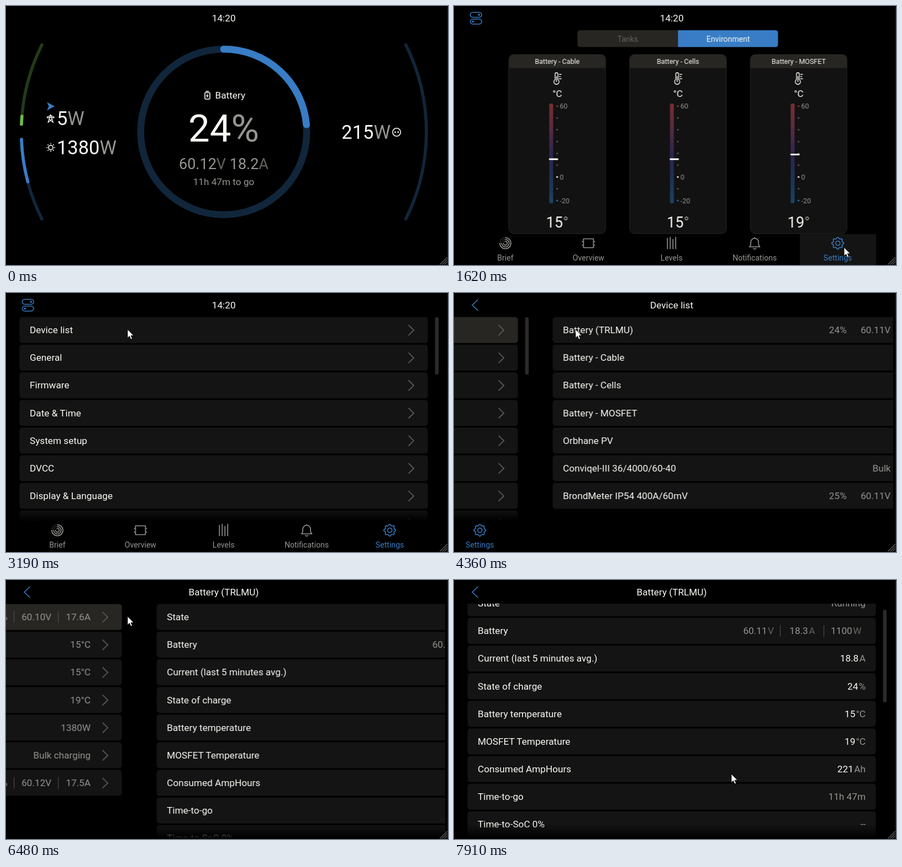
Write an HTML page that moves like this. It is 800 by 470 pixels and loops after 8000 ms.

```html
<!DOCTYPE html>
<html lang="en">
<head>
<meta charset="utf-8">
<title>Energy monitor</title>
<style>
html, body { margin: 0; height: 100%; overflow: hidden; background: #000; }
svg { display: block; width: 800px; height: 470px; }
text { font: 17.2px Roboto, sans-serif; fill: #fafaf5; white-space: pre; }
.s12 { font-size: 12.5px; }
.s14 { font-size: 14.1px; }
.s27 { font-size: 27px; }
.s34 { font-size: 34.45px; }
.s69 { font-size: 69px; }
.m { text-anchor: middle; }
.e { text-anchor: end; }
.g { fill: #969591; }
.d { fill: #64635f; }
.c { fill: currentColor; }
.line { fill: none; stroke: currentColor; stroke-width: 1.6; stroke-linecap: round; stroke-linejoin: round; }
.white { color: #fafaf5; }
.blue { color: #387dc5; }
.grey { color: #969591; }
.chev { fill: none; stroke: #5c5b58; stroke-width: 1.8; }
</style>
</head>
<body>
<svg id="stage" viewBox="0 0 800 470"></svg>
<script>
const W = 802, LOOP = 8000;
const BLUE = '#387dc5', NAVY = '#11263b', GREEN = '#72b84c', MOSS = '#233a18', BAR = '#272622', ROW = '#141414';

// ---- timeline: keyframes written in ms, held unless a step names an easing
const EASE = v => `;animation-timing-function:${v}`;
const QUAD_IN = EASE('cubic-bezier(.333333,0,.666667,.333333)');
const QUAD_OUT = EASE('cubic-bezier(.333333,.666667,.666667,1)');
const move = (x, y = 0) => `transform:translate(${x}px,${y}px)`;

const frames = (name, steps) =>
  `@keyframes ${name}{${Object.entries(steps).map(([ms, css]) => `${ms * 100 / LOOP}%{${css}}`).join('')}}` +
  `.${name}{animation:${name} ${LOOP}ms step-end infinite}`;
const show = (name, from, to = LOOP) =>
  frames(name, { 0: 'opacity:0', [from]: 'opacity:1', [to]: 'opacity:0' });
const slide = (start, end, a, b) => ({
  [start]: move(a) + QUAD_IN,
  [(start + end) / 2]: move((a + b) / 2) + QUAD_OUT,
  [end]: move(b)
});
const swapAt = (name, ms) => show(name + 'Old', 0, ms) + show(name + 'New', ms);

const TAB = 1342, PUSH1 = 4154, PUSH2 = 6299;
const css = [
  frames('pager', { 0: move(0), ...slide(TAB, TAB + 560, 0, -4 * W) }),
  frames('stack', { 0: move(0), ...slide(PUSH1, PUSH1 + 300, 0, -W), ...slide(PUSH2, PUSH2 + 300, -W, -2 * W) }),
  frames('scroll', { 0: move(0), 7910: move(0, -25) }),
  frames('thumb', { 0: move(0), 7910: move(0, 10) }),
  frames('nav', { 0: 'opacity:0', 300: 'opacity:0' + EASE('linear'), 600: 'opacity:1' }),
  frames('tabOff', { 0: 'color:' + BLUE, [TAB]: 'color:#969591' }),
  frames('tabOn', { 0: 'color:#969591', [TAB]: 'color:' + BLUE }),
  frames('press', { 0: 'opacity:0', 1230: 'opacity:1', 1900: 'opacity:1' + EASE('linear'), 2070: 'opacity:.25', 2410: 'opacity:0' }),
  frames('cursor', {
    0: 'opacity:0;' + move(738, 330),
    250: 'opacity:1;' + move(738, 330) + EASE('ease-in-out'),
    1050: move(707, 437), 1250: move(706, 438),
    2410: move(706, 438) + EASE('ease-in-out'), 3190: move(220, 66),
    7060: move(220, 66) + EASE('ease-in-out'), 7750: move(502, 352)
  }),
  show('clock', 0, PUSH1), show('title1', PUSH1, PUSH2), show('title2', PUSH2),
  show('toggles', TAB, PUSH1), show('back', PUSH1),
  show('hit1', 4060), show('hit2', 6200), show('seps', 4460),
  swapAt('live', 650), swapAt('dev', 5290), swapAt('det', 7300)
].join('\n');

// ---- drawing helpers
const text = (x, y, s, cls = '') => `<text x="${x}" y="${y}" class="${cls}">${s}</text>`;
const unit = (n, u, cls = 'g', gap = 0) => `${n}<tspan class="${cls}" dx="${gap}">${u}</tspan>`;
const rect = (x, y, w, h, fill, more = '') => `<rect x="${x}" y="${y}" width="${w}" height="${h}" fill="${fill}" ${more}/>`;
const line = (d, cls = '', more = '') => `<path class="line ${cls}" d="${d}" ${more}/>`;
const shape = (d, fill) => `<path d="${d}" fill="${fill}"/>`;
const dot = (x, y, r, fill) => `<circle cx="${x}" cy="${y}" r="${r}" fill="${fill}"/>`;
const group = (cls, s) => `<g class="${cls}">${s}</g>`;
const at = (x, s) => `<g transform="translate(${x})">${s}</g>`;
const swap = (name, f, a, b) => group(name + 'Old', f(...a)) + group(name + 'New', f(...b));

const rowY = i => 43.7 + i * 50.15;
const baseY = i => rowY(i) + 29.4;
const rowBox = (i, fill) => rect(24.5, rowY(i), 739, 47, fill, 'rx="5"');
const rows = (labels, hit) =>
  labels.map((_, i) => rowBox(i, ROW)).join('') +
  (hit ? group(hit, rowBox(0, BAR)) : '') +
  labels.map((s, i) => text(43, baseY(i), s)).join('');
const chevron = i => `<path class="chev" d="M728.5 ${rowY(i) + 14.5}l9.5 9.3-9.5 9.3"/>`;
const chevrons = labels => labels.map((_, i) => chevron(i)).join('');
const sep = (x, i) => rect(x, rowY(i) + 13, 1, 21, '#54534f');

// ---- brief page
const R = 353.7;
function sideArc(y1, y2, color, right) {
  const px = y => { const x = 27.7 + R - Math.sqrt(R * R - (y - 228.5) ** 2); return right ? 788.6 - x : x; };
  return line(`M${px(y1)} ${y1}A${R} ${R} 0 0 ${right ? 1 : 0} ${px(y2)} ${y2}`, '', `style="stroke:${color};stroke-width:5.6"`);
}
const ring = (color, dash) =>
  `<circle cx="394" cy="228.5" r="150.3" fill="none" stroke="${color}" stroke-width="12.6" stroke-linecap="round"
    pathLength="360" transform="rotate(-90 394 228.5)" ${dash}/>`;
const rays = Array.from({ length: 8 }, (_, k) => {
  const c = Math.cos(k * Math.PI / 4), s = Math.sin(k * Math.PI / 4);
  return `M${81 + 6.4 * c} ${257 + 6.4 * s}L${81 + 7.2 * c} ${257 + 7.2 * s}`;
}).join('');

const live = (color, track, arrow, grid, pv, volt, amp, load) =>
  sideArc(70.5, 214.5, track) + sideArc(200, 214.5, color) + arrow +
  text(92, 215.5, unit(grid, 'W'), 's34') + text(92, 269, unit(pv, 'W'), 's34') +
  text(394, 295.8, unit(volt, 'V ', 'd') + unit(amp, 'A', 'd'), 's27 g m') +
  text(696, 241, unit(load, 'W'), 's34 e');

const brief =
  ring(NAVY, '') + ring(BLUE, 'stroke-dasharray="85 360"') +
  sideArc(242, 386.5, NAVY) + sideArc(242, 319, BLUE) + sideArc(70.5, 386.5, NAVY, true) +
  swap('live', live,
    [GREEN, MOSS, shape('M74 174.5L88 182 74 189.5 77.5 182z', BLUE), 5, 1380, '60.12', '18.2', 215],
    [BLUE, NAVY, shape('M86.5 175L73 182 86.5 189 83.5 182z', GREEN), 20, 1379, '60.10', '18.4', 224]) +
  group('white',
    line('M361 157h6.5q1.5 0 1.5 1.5v9q0 1.5-1.5 1.5h-6q-1.5 0-1.5-1.5v-9q0-1.5 1.5-1.5M362 154.8h4.5') +
    shape('M365.6 158.5l-4 5h2.3l-1 4 4-5h-2.3z', '#fafaf5') +
    line('M80.7 197L76 211.5M80.7 197l4.7 14.5M74.5 203v-1.5l6.2-3 6.2 3V203M75.5 202.5h10.5M78.5 205.5l6 5M83 205.5l-6 5', '', 'style="stroke-width:1.3"') +
    line('M77 257a4 4 0 1 0 8 0a4 4 0 1 0-8 0' + rays) +
    line('M699.8 229a7.2 7.2 0 1 0 14.4 0a7.2 7.2 0 1 0-14.4 0') +
    dot(704.3, 229, 1.4, '#fafaf5') + dot(709.7, 229, 1.4, '#fafaf5')) +
  text(378.5, 167.7, 'Battery') +
  text(394, 245.5, unit(24, '%'), 's69 m') +
  text(394, 325, '11h 47m to go', 'g m');

// ---- levels page
const MARKS = { 0: ['60', '#a04040'], 6: ['0', '#fafaf5'], 8: ['-20', BLUE] };
function card(cx, name, temp) {
  const x = cx - 87.5, s = cx - 1.5, level = 310.2 - temp * 2.14;
  let scale = '';
  for (let k = 0; k < 9; k++) {
    const y = 181.8 + k * 21.4, [label, color] = MARKS[k] || ['', '#5c5b58'];
    scale += dot(cx - .3, y, 1.5, color) + text(cx + 4.5, y + 4.5, label, 's12 g');
  }
  return rect(x, 88, 175, 325, '#121212', 'rx="9"') +
    shape(`M${x} 112.5V97q0-9 9-9h157q9 0 9 9v15.5z`, BAR) +
    rect(x, 88, 175, 325, 'none', `rx="9" stroke="${BAR}"`) +
    text(cx, 104.5, name, 's12 m') +
    group('white',
      line(`M${s - 2.5} 133.5V123.5a2.5 2.5 0 0 1 5 0v10a4.7 4.7 0 1 1-5 0zM${s} 128v9.5M${s + 5} 124h3.5M${s + 5} 128h2M${s + 5} 132h3.5`, '', 'style="stroke-width:1.4"')) +
    text(cx, 165.3, '°C', 'm') +
    rect(cx - 14.5, 177, 7, 181, 'url(#heat)', 'rx="2.5"') + scale +
    rect(cx - 15, level - 1.5, 16.5, 3, '#fff', 'rx="1"') +
    text(cx, 401.5, unit(temp, '°'), 's27 m');
}
const levels =
  shape('M217 44h177v30.5h-177q-5 0-5-5V49q0-5 5-5', BAR) +
  shape('M394 44h176q5 0 5 5v20.5q0 5-5 5h-176z', BLUE) +
  text(303, 64.5, 'Tanks', 's14 d m') + text(484.8, 64.5, 'Environment', 's14 m') +
  card(175.5, 'Battery - Cable', 15) + card(394, 'Battery - Cells', 15) + card(612.5, 'Battery - MOSFET', 19);

// ---- settings page
const SETTINGS = ['Device list', 'General', 'Firmware', 'Date &amp; Time', 'System setup', 'DVCC', 'Display &amp; Language', 'Web online portal'];
const settings =
  rows(SETTINGS, 'hit1') + chevrons(SETTINGS) +
  rect(776.5, 44, 6.5, 104, '#2c2b28', 'rx="3"') +
  rect(0, 392, W, 22, 'url(#fade)');

// ---- navigation bar
const gear = (() => {
  let d = '';
  for (let k = 0; k < 48; k++) {
    const a = k * Math.PI / 24, r = 9.6 + 1.3 * Math.cos(a * 8);
    d += `${k ? 'L' : 'M'}${(r * Math.cos(a)).toFixed(1)} ${(r * Math.sin(a)).toFixed(1)}`;
  }
  return d + 'zM-4 0a4 4 0 1 0 8 0a4 4 0 1 0-8 0';
})();
const spiral = [10, 6.7, 3.4].map(r =>
  line(`M0 ${-r}A${r} ${r} 0 1 1 ${-r} 0`) +
  line(`M${-r} 0A${r} ${r} 0 0 1 0 ${-r}`, '', 'stroke-dasharray=".1 3" style="stroke-width:1.2"')).join('');
const tab = (k, label, cls, icon) => {
  const x = 93 + k * 150.4;
  return group(cls, `<g transform="translate(${x} 430.5)">${icon}</g>` + text(x, 462, label, 's14 m c'));
};
const nav = group('nav',
  rect(0, 414, W, 56, '#000') + group('press', rect(626, 414, 138, 56, ROW)) +
  tab(0, 'Brief', 'tabOff', spiral) +
  tab(1, 'Overview', 'grey', line('M-9-8H9V8H-9zM-11-3.5v1M11-3.5v1M-11 3v1M11 3v1')) +
  tab(2, 'Levels', 'grey', line('M-7.5-9V10M-2.5-11V10M2.5-7V10M7.5-11V10')) +
  tab(3, 'Notifications', 'grey', line('M-9.5 6.5q2.5-2 2.5-5v-3.5a7 7 0 0 1 14 0v3.5q0 3 2.5 5zM-2.5 9.5q2.5 2 5 0M0-9v-1.5')) +
  tab(4, 'Settings', 'tabOn', line(gear)));

// ---- device list
const DEVICES = ['Battery (TRLMU)', 'Battery - Cable', 'Battery - Cells', 'Battery - MOSFET', 'Orbhane PV',
  'Conviqel-III 36/4000/60-40', 'BrondMeter IP54 400A/60mV'];
const READINGS = ['', '15°C', '15°C', '19°C', '1380W', 'Bulk charging', ''];
const power = (v1, a1, v2, a2) => [[0, v1, a1], [6, v2, a2]].map(([i, v, a]) =>
  text(636, baseY(i), v + 'V', 'g e') + text(707, baseY(i), a + 'A', 'g e')).join('');
const devices =
  rows(DEVICES, 'hit2') + chevrons(DEVICES) +
  READINGS.map((s, i) => text(707, baseY(i), s, 'g e')).join('') +
  text(556.5, baseY(0), '24%', 'g e') + text(556.5, baseY(6), '25%', 'g e') +
  group('seps', [0, 6].map(i => sep(568, i) + sep(648, i)).join('')) +
  swap('dev', power, ['60.11', '18.2', '60.11', '18.1'], ['60.10', '17.6', '60.12', '17.5']);

// ---- battery details
const DETAILS = [
  ['State', '<tspan class="g">Running</tspan>'], ['Battery', ''],
  ['Current (last 5 minutes avg.)', unit('18.8', 'A', 'g', 1.5)],
  ['State of charge', unit(24, '%', 'g', 1)],
  ['Battery temperature', unit(15, '°C', 'g', 1)],
  ['MOSFET Temperature', unit(19, '°C', 'g', 1)],
  ['Consumed AmpHours', unit(221, 'Ah', 'g', 1.5)],
  ['Time-to-go', '<tspan class="g">11h 47m</tspan>'],
  ['Time-to-SoC 0%', '<tspan class="g">--</tspan>']
];
const flow = (v, a, w) => [[579, v, 'V'], [653.5, a, 'A'], [737.5, w, 'W']]
  .map(([x, n, u]) => text(x, baseY(1), unit(n, u, 'd', 1.5), 'g e')).join('');
const details =
  `<g clip-path="url(#body)">` + group('scroll',
    rows(DETAILS.map(([s]) => s)) +
    DETAILS.map(([, v], i) => text(745, baseY(i), v, 'e')).join('') +
    sep(590, 1) + sep(669, 1) +
    swap('det', flow, ['60.10', '17.6', 1057], ['60.11', '18.3', 1100])) + '</g>' +
  group('thumb', rect(776.5, 44, 6.5, 168, '#2c2b28', 'rx="3"')) +
  rect(0, 444, W, 26, 'url(#fade)');

// ---- fixed parts
const status =
  group('clock', text(394.2, 27.5, '14:20', 'm')) +
  group('title1', text(394, 27.5, 'Device list', 'm')) +
  group('title2', text(394, 27.5, 'Battery (TRLMU)', 'm')) +
  group('toggles', group('blue',
    [11.5, 23.7].map(y => rect(29.5, y, 20.5, 9, 'none', 'rx="4.5" class="line"')).join('') +
    dot(45.3, 16, 1.8, BLUE) + dot(34.3, 28.2, 1.8, BLUE))) +
  group('back', line('M43 12.5L33 22l10 9.5', 'blue'));
const chrome =
  rect(799, 0, 1, 470, '#222') +
  `<path d="M785.5 469l13-13M789.5 469l9-9M793.5 469l5-5" stroke="#aaa"/>`;
const pointer = group('cursor',
  '<path d="M0 0V15.5L3.6 12.2 6 18 8.6 17 6.2 11.3H11z" fill="#fff" stroke="#000" stroke-width=".8"/>');

const stops = list => list.map(([o, c, a = 1]) => `<stop offset="${o}" stop-color="${c}" stop-opacity="${a}"/>`).join('');
const gradient = (id, list) => `<linearGradient id="${id}" x2="0" y2="1">${stops(list)}</linearGradient>`;

document.getElementById('stage').innerHTML =
  `<style>${css}</style><defs>` +
  gradient('heat', [[0, '#7a2f30'], [.3, '#512a45'], [.52, '#2a2550'], [.75, '#1d3257'], [1, '#1e4265']]) +
  gradient('fade', [[0, '#000', 0], [1, '#000']]) +
  `<clipPath id="view"><rect width="795" height="470"/></clipPath>
   <clipPath id="body"><rect y="43.7" width="${W}" height="427"/></clipPath></defs>` +
  rect(0, 0, 800, 470, '#000') +
  `<g clip-path="url(#view)">` +
  group('stack',
    group('pager', brief + at(2 * W, levels) + at(4 * W, settings)) + nav +
    at(W, devices) + at(2 * W, details)) +
  status + '</g>' + chrome + pointer;
</script>
</body>
</html>
```
